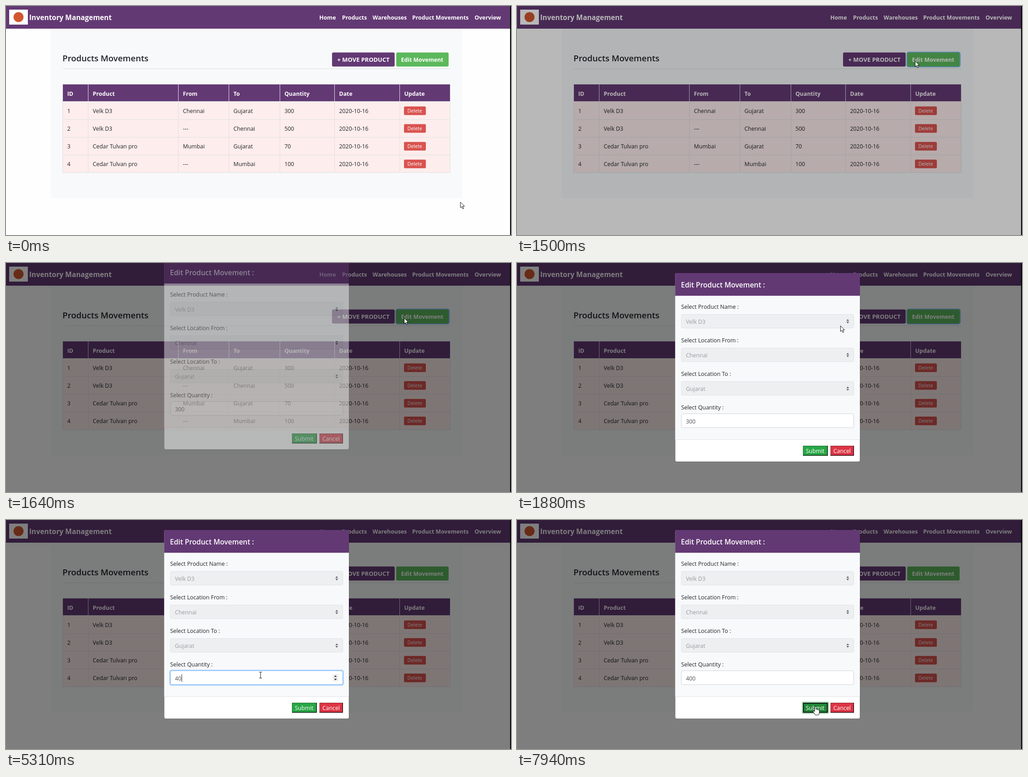
These frames come from a looping animation (1109x505 px, 8000 ms). An HTML page:

```html
<!DOCTYPE html>
<html lang="en">
<head>
<meta charset="utf-8">
<title>Inventory Management</title>
<style>
html, body { margin: 0; width: 100%; height: 100%; overflow: hidden; background: #fefefe; }
svg { display: block; width: 1109px; height: 505px; font: 12.35px "Open Sans", "Noto Sans", sans-serif; }
text { white-space: pre; }
</style>
</head>
<body>
<svg id="stage" viewBox="0 0 1109 505"></svg>
<script>
const PURPLE = '#633974', INK = '#212529', LINE = '#dee2e6';

const rect = (x, y, w, h, fill, more = '') =>
  `<rect x="${x}" y="${y}" width="${w}" height="${h}" fill="${fill}" ${more}/>`;
const text = (x, y, str, fill = INK, size = 12.35, weight = 400, more = '') =>
  `<text x="${x}" y="${y}" fill="${fill}" font-size="${size}" font-weight="${weight}" ${more}>${str}</text>`;
const bold = (x, y, str, size = 12.35) => text(x, y, str, '#fff', size, 700);
const path = (d, fill, more = '') => `<path d="${d}" fill="${fill}" ${more}/>`;

function navbar() {
  const links = [[688, 'Home'], [738, 'Products'], [805, 'Warehouses'], [892, 'Product Movements'], [1029, 'Overview']];
  return rect(0, 0, 1107, 50, PURPLE) +
    rect(7, 8, 41, 33, '#fff') +
    '<circle cx="27.5" cy="24.5" r="11" fill="#d2562f"/>' +
    bold(51, 30.5, 'Inventory Management', 15.4) +
    links.map(([x, s]) => bold(x, 29.5, s)).join('');
}

function table() {
  const cols = [124.5, 180.5, 378.5, 489.5, 601.5, 721.5, 864.5, 975.5];
  const heads = ['ID', 'Product', 'From', 'To', 'Quantity', 'Date', 'Update'];
  const rows = [
    ['1', 'Velk D3', 'Chennai', 'Gujarat', '300'],
    ['2', 'Velk D3', '---', 'Chennai', '500'],
    ['3', 'Cedar Tulvan pro', 'Mumbai', 'Gujarat', '70'],
    ['4', 'Cedar Tulvan pro', '---', 'Mumbai', '100'],
  ];
  let out = rect(124.5, 173, 851.5, 37.5, PURPLE) + rect(124.5, 210.5, 851.5, 157, '#fdedec');
  cols.forEach(x => out += path(`M${x} 173V368`, 'none', `stroke="${LINE}"`));
  [172.5, 210.5, 250.5, 289.5, 328.5, 367.5].forEach(y => out += path(`M124 ${y}H976`, 'none', `stroke="${LINE}"`));
  heads.forEach((s, i) => out += bold(cols[i] + 10, 197.5, s));
  rows.forEach((row, r) => {
    const y = 235.5 + 39.1 * r;
    [...row, '2020-10-16'].forEach((s, i) => out += text(cols[i] + 10, y, s));
    out += rect(874, y - 14, 48, 19, '#d9534f', 'rx="2.5"') + text(881.5, y - .5, 'Delete', '#fff', 10.7);
  });
  return out;
}

function page() {
  return rect(0, 0, 1107, 505, '#fefefe') +
    rect(98.5, 40, 903.5, 384, '#f8f9fa', 'rx="4"') + navbar() +
    text(124, 122, 'Products Movements', INK, 18.5, 600) +
    path('M125 138.5H976', 'none', `stroke="${LINE}"`) +
    rect(716, 102.5, 137.5, 31, PURPLE, 'rx="3"') + bold(727.5, 123, '+ MOVE PRODUCT', 13) +
    rect(856.3, 101.8, 116.9, 32.4, 'none', 'id="editRing" rx="4" stroke="#80bdff" stroke-width="2.2"') +
    rect(857, 102.5, 115, 31, '#5cb85c', 'rx="3"') + bold(867.5, 123, 'Edit Movement', 12.3) +
    table();
}

function bevel(x, w, fill, label, id) {
  return rect(x, 403, w, 22, fill, `id="${id}"`) +
    path(`M${x + .5} 425V403.5H${x + w}`, 'none', 'stroke="#000" stroke-opacity=".35"') +
    path(`M${x} 424.3H${x + w - .7}V403`, 'none', 'stroke="#000" stroke-opacity=".8" stroke-width="1.4"') +
    text(x + 6.3, 419.3, label, '#fff');
}

const arrows = (x, y, gap, fill) =>
  path(`M${x - 3} ${y - gap}h6l-3 -3.6zM${x - 3} ${y + gap}h6l-3 3.6z`, fill);

function dialog() {
  const selects = [['Select Product Name :', 'Velk D3'], ['Select Location From :', 'Chennai'], ['Select Location To :', 'Gujarat']];
  let out = rect(347.5, 22, 405.5, 416, '#fff', 'rx="3.5" stroke="#000" stroke-opacity=".2"') +
    path('M347.5 72.5V25.5q0 -3.5 3.5 -3.5H749.5q3.5 0 3.5 3.5V72.5z', PURPLE) +
    rect(347.5, 72.5, 405.5, 317, '#f8f9fa') +
    path('M347.5 389.5H753', 'none', `stroke="${LINE}"`) +
    text(360, 53.5, 'Edit Product Movement :', '#fff', 15.55, 600);
  selects.forEach(([label, value], i) => {
    const y = 74.2 * i;
    out += text(360.5, 100.5 + y, label) +
      rect(361, Math.round(113 + y) + .5, 378.5, 30, '#eeeff1', `rx="3" stroke="${LINE}"`) +
      text(371, 133.5 + y, value, '#999b9e') + arrows(726.3, 128.6 + y, 1, '#5d6166');
  });
  return out + text(360.5, 322.5, 'Select Quantity :') +
    rect(361, 332.5, 378.5, 30.5, '#fff', 'rx="3" stroke="#ced4da"') +
    `<g id="fieldRing">${rect(359.7, 331.2, 381.1, 33.1, 'none', 'rx="4" stroke="#007bff" stroke-opacity=".27" stroke-width="2.6"')}
     ${rect(361, 332.5, 378.5, 30.5, 'none', 'rx="3" stroke="#80bdff"')}</g>` +
    text(371, 353.5, '', '#495057', 12.35, 400, 'id="value"') +
    rect(-9, 340, 1, 17, '#222', 'id="caret"') +
    `<g id="spinner">${rect(717, 340, 13, 16, '#efefef')}${arrows(723.5, 348, 2, '#333')}</g>` +
    bevel(628, 54.5, '#28a745', 'Submit', 'submit') + bevel(688.5, 51.5, '#dc3545', 'Cancel', 'cancel') +
    `<g id="submitRing">${rect(627, 402, 56.5, 24, 'none', 'rx="1.5" stroke="#28a745" stroke-opacity=".45" stroke-width="3"')}
     ${rect(629, 404, 52.5, 20, 'none', 'rx="1" stroke="#111" stroke-width="1.8"')}</g>`;
}

const outline = 'stroke="#000" stroke-width=".9" stroke-linejoin="round"';
const cursors = {
  arrow: path('M.5 .5V13L3.4 10.3 5.5 15.3 7.6 14.4 5.5 9.5H9.4z', '#fff', outline),
  beam: path('M-3 -6.5h2q1 0 1 1q0 -1 1 -1h2M0 -6V6M-3 6.5h2q1 0 1 -1q0 1 1 1h2', 'none', 'stroke="#222" stroke-width="1.1"'),
  hand: path('M-1.4 10V1.4Q-1.4 0 0 0T1.4 1.4V6.3Q3.4 5.4 4.2 7Q6 6.3 6.8 7.8Q9 7.2 9 9.4V13Q9 16 7.4 19H.2Q-1 16.4 -4.4 12.4Q-5.6 10.8 -4.2 10T-1.4 11.4z', '#fff', outline),
};

const $ = id => document.getElementById(id);
$('stage').innerHTML = page() +
  rect(0, 0, 1107, 505, '#000', 'id="shade"') + rect(1107, 0, 2, 505, '#000') +
  `<g id="dialog">${dialog()}</g><g id="cursor"></g>`;

// Each track lists [start, ...state]; states hold until the next start.
const moves = [
  [0, 997.5, 432, 'arrow'], [70, 988, 375, 'arrow'], [130, 975, 316, 'arrow'],
  [330, 918, 215, 'arrow'], [420, 870, 138, 'arrow'], [580, 864, 131, 'arrow'],
  [660, 864, 127, 'hand'], [740, 870, 123, 'hand'], [810, 874, 121, 'hand'],
  [1270, 874, 121, 'arrow'], [1800, 800, 130, 'arrow'], [1880, 710, 138, 'arrow'],
  [2110, 650, 180, 'arrow'], [2190, 607, 213, 'arrow'], [2420, 590, 255, 'arrow'],
  [2500, 575, 300, 'arrow'], [2580, 567, 329, 'arrow'], [2730, 564, 345, 'beam'],
  [2810, 561, 344, 'beam'], [2960, 559, 342, 'beam'], [6090, 640, 375, 'arrow'],
  [6160, 722, 412, 'arrow'], [6240, 700, 430, 'arrow'], [6400, 682, 418, 'arrow'],
  [6480, 664, 408, 'arrow'], [6620, 653, 402, 'arrow'], [7020, 654, 409, 'hand'],
  [7160, 654, 410, 'hand'], [7400, 654, 412, 'arrow'], [7940, 655, 411, 'hand'],
];
const typed = [[0, '300'], [3890, '30'], [4120, '3'], [4290, ''], [4990, '4'], [5310, '40'], [5540, '400']];
const carets = [[0, -9], [3280, 392], [3740, -9], [4290, 371], [4840, -9], [4990, 378.5], [5310, 385.5], [5540, 392], [6090, -9], [6620, 392], [7160, -9]];
const editFocus = [[0, 0], [1270, .5], [1340, 1], [3280, .6], [3350, .3], [3430, 0]];
const fieldFocus = [[0, 0], [3280, .4], [3350, .8], [3430, 1], [7330, .6], [7400, .3], [7480, 0]];
const submitFocus = [[0, 0], [7330, .4], [7400, .8], [7480, 1]];
const submitFill = [[0, '#28a745'], [7020, '#269d41'], [7090, '#23913c'], [7160, '#218838']];
const opening = [0, 1420, 1500, 1560, 1640, 1730, 1800, 1880].map(t => [t]);

const at = (track, t) => track.findLast(s => s[0] <= t);
const ramp = (t, start, length) => Math.min(1, Math.max(0, (t - start) / length));

function draw(now) {
  const t = now % 8000;
  const step = at(opening, t)[0];
  const drop = -40 * (1 - ramp(step, 1571, 300)) ** 1.5;
  $('shade').setAttribute('opacity', .5 * ramp(step, 1416, 150));
  $('dialog').setAttribute('opacity', ramp(step, 1571, 150));
  $('dialog').setAttribute('transform', `translate(0 ${Math.round(drop)})`);

  const value = at(typed, t)[1];
  $('value').textContent = value || 'Enter Product Quantity';
  $('value').setAttribute('fill', value ? '#495057' : '#6c757d');
  $('caret').setAttribute('x', at(carets, t)[1]);
  $('spinner').setAttribute('opacity', t >= 2730 && t < 7330 ? 1 : 0);
  $('editRing').setAttribute('opacity', at(editFocus, t)[1]);
  $('fieldRing').setAttribute('opacity', at(fieldFocus, t)[1]);
  $('submitRing').setAttribute('opacity', at(submitFocus, t)[1]);
  $('submit').setAttribute('fill', at(submitFill, t)[1]);

  const [, x, y, kind] = at(moves, t);
  $('cursor').innerHTML = cursors[kind];
  $('cursor').setAttribute('transform', `translate(${x} ${y})`);
}

const start = performance.now();
function loop() {
  draw(performance.now() - start);
  requestAnimationFrame(loop);
}
loop();
</script>
</body>
</html>
```
